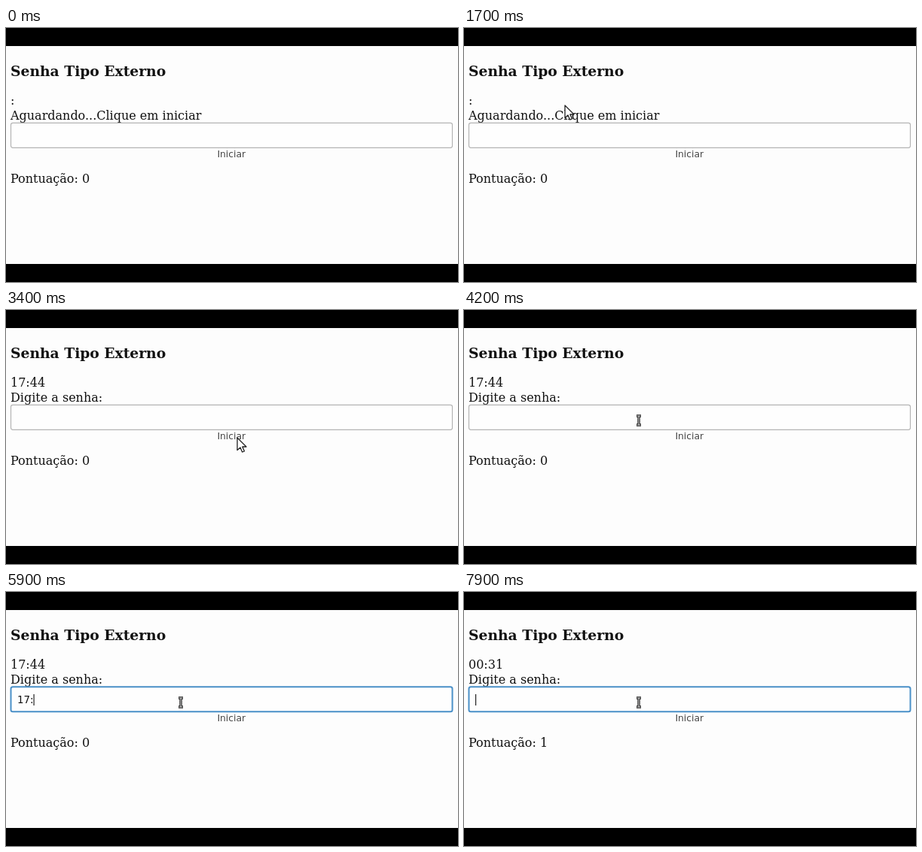
An HTML page for the animation above (8000 ms loop, 600 by 338 pixels).

```html
<!DOCTYPE html>
<html lang="pt">
<head>
<meta charset="utf-8">
<title>Senha</title>
<style>
  html, body { margin: 0; width: 100%; height: 100%; overflow: hidden; background: #000; }
  svg { display: block; width: 100%; height: 100%; }
  text { font: 16px "DejaVu Serif", serif; fill: #111; white-space: pre; }
  .title { font-size: 18.72px; font-weight: bold; }
  .button { font: 12.3px "DejaVu Sans", sans-serif; fill: #444; }
  .entry { font: 13.33px "DejaVu Sans", sans-serif; }
</style>
</head>
<body>
<svg viewBox="0 0 600 338">
  <rect width="600" height="338"/>
  <rect y="24" width="600" height="290" fill="#fdfdfd"/>
  <text class="title" x="6" y="64">Senha Tipo Externo</text>
  <text id="code" x="6" y="102"></text>
  <text id="label" x="6" y="121.5"></text>
  <rect id="field" x="6.5" y="126.3" width="586" height="33" rx="2.5" fill="#fefefe"/>
  <text id="entry" class="entry" x="15" y="148"></text>
  <rect id="caret" y="136" width="1.2" height="15" fill="#222"/>
  <text class="button" x="280.4" y="172">Iniciar</text>
  <text id="score" x="6" y="206"></text>
  <path id="arrow" d="M0 0V16.5L4 13L6.6 19L9.4 17.8L6.8 12H12Z" fill="#fff" stroke="#222" stroke-width="1.3" stroke-linejoin="round"/>
  <g id="beam" fill="none">
    <path d="M-3 -6H3M-3 6H3M0 -6V6" stroke="#222" stroke-width="3.4"/>
    <path d="M-2.5 -6H2.5M-2.5 6H2.5M0 -6V6" stroke="#ddd" stroke-width="1"/>
  </g>
</svg>
<script>
const LOOP = 8000, STEP = 100;
const el = id => document.getElementById(id);
const [code, label, field, entry, caret, score, arrow, beam] =
  ["code", "label", "field", "entry", "caret", "score", "arrow", "beam"].map(el);

// Pointer stops: time, x, y
const stops = [
  [900, 228, 295], [1150, 130, 60], [1400, 12, 95], [1700, 134, 103],
  [2100, 52, 192], [2500, 304, 172], [2600, 307, 170],
  [3500, 307, 170], [4100, 232, 147]
];
const keyTimes = [5400, 5600, 5800, 6000, 6200];
const START = 3100, FOCUS = 4300, SUBMIT = 6600;

const show = (node, on) => node.setAttribute("visibility", on ? "visible" : "hidden");

function pointerAt(t) {
  const next = stops.findIndex(stop => stop[0] > t);
  if (next < 0) return stops[stops.length - 1].slice(1);
  const [t0, x0, y0] = stops[Math.max(0, next - 1)];
  const [t1, x1, y1] = stops[next];
  const u = t1 > t0 ? (t - t0) / (t1 - t0) : 0;
  const ease = u * u * (3 - 2 * u);
  return [x0 + (x1 - x0) * ease, y0 + (y1 - y0) * ease];
}

function drawPointer(t) {
  const [x, y] = pointerAt(t);
  const overField = t > 3500 && y < 160;
  show(arrow, t >= stops[0][0] && !overField);
  show(beam, overField);
  for (const node of [arrow, beam]) node.setAttribute("transform", `translate(${x} ${y})`);
}

function drawField(t) {
  const focused = t >= FOCUS;
  field.setAttribute("stroke", focused ? "#4a90c8" : "#b4b4b4");
  field.setAttribute("stroke-width", focused ? 2 : 1.2);
  const typed = t < SUBMIT ? keyTimes.filter(k => k <= t).length : 0;
  entry.textContent = "17:44".slice(0, typed);
  caret.setAttribute("x", 15 + (typed ? entry.getComputedTextLength() : 0));
  show(caret, t >= FOCUS + 100 && !(t >= 7300 && t < 7900));
}

function draw(t) {
  const done = t >= SUBMIT;
  code.textContent = t < START ? ":" : done ? "00:31" : "17:44";
  label.textContent = t < START ? "Aguardando...Clique em iniciar" : "Digite a senha:";
  score.textContent = "Pontuação: " + (done ? 1 : 0);
  drawField(t);
  drawPointer(t);
}

const began = performance.now();
function tick() {
  const t = (performance.now() - began) % LOOP;
  draw(Math.floor(t / STEP) * STEP);
  requestAnimationFrame(tick);
}
tick();
</script>
</body>
</html>
```
